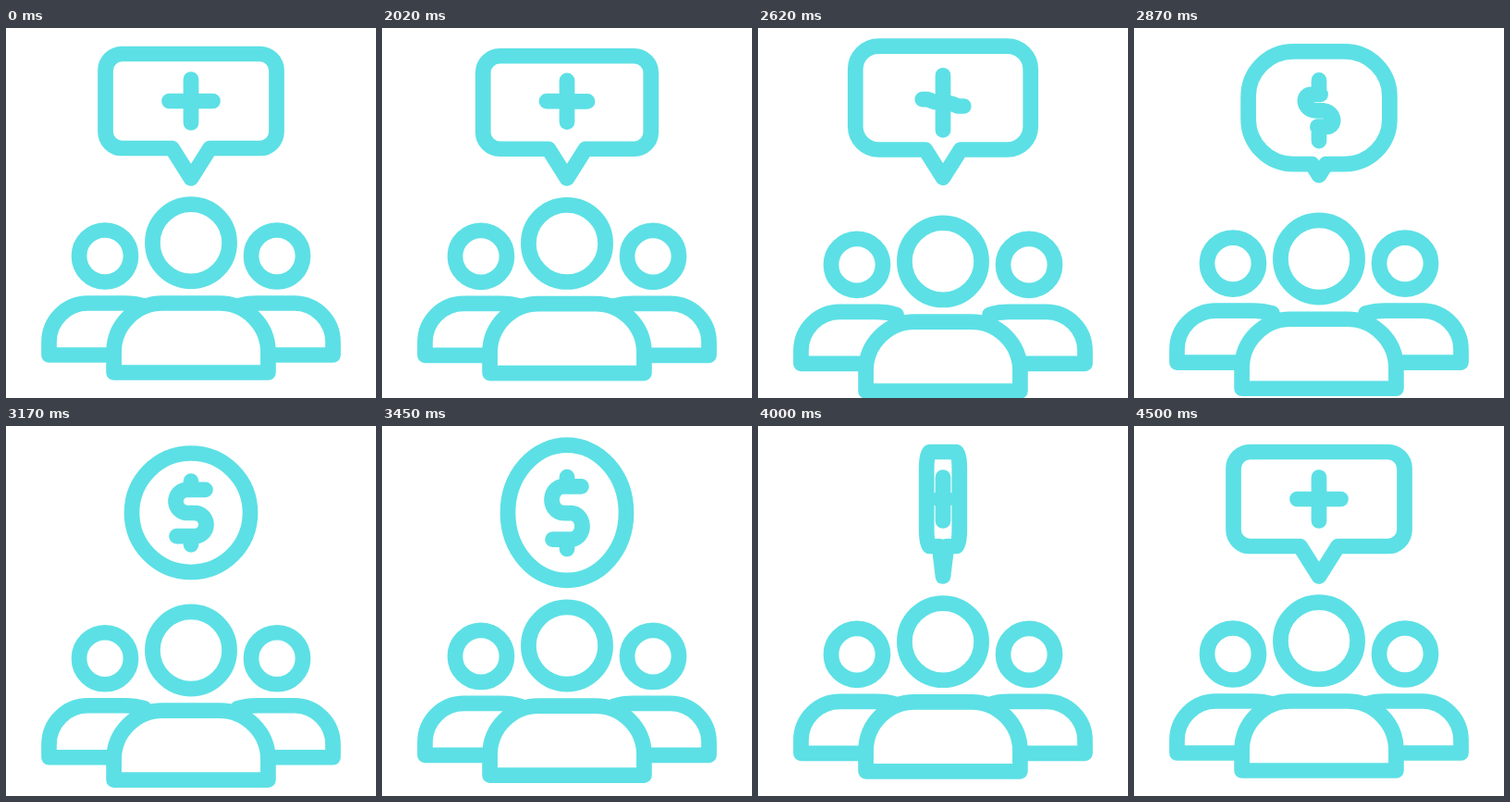
Recreate the animation shown at these times as an HTML page. Size 400 by 400 pixels, loop 4520 ms.

```html
<!DOCTYPE html>
<html lang="en">
<head>
<meta charset="utf-8">
<title>Group, care and cost</title>
<style>
  html, body { margin: 0; height: 100%; overflow: hidden; background: #fff; }
  svg { display: block; width: 100%; height: 100%; }
</style>
</head>
<body>
<svg viewBox="0 0 400 400" fill="none" stroke="#5ce0e5" stroke-width="16.7"
     stroke-linecap="round" stroke-linejoin="round">
  <g id="sides">
    <g id="member">
      <circle cx="107" cy="246.5" r="28"/>
      <path d="M116 353.5H46.5V339.5A42 42 0 0 1 88.5 297.5H128Q140 297.5 149.5 300.5"/>
    </g>
    <use href="#member" transform="translate(400) scale(-1 1)"/>
  </g>
  <g id="leader">
    <circle cx="200" cy="232.3" r="41.6"/>
    <path d="M116.6 372.5V350.5A53 53 0 0 1 169.6 297.5H230.4A53 53 0 0 1 283.4 350.5V372.5Z"/>
  </g>
  <path id="frame"/>
  <path id="sign"/>
</svg>
<script>
const LOOP = 4520, COIN_Y = 93.75, SIGN_Y = 81, TIP_Y = 163;
const el = id => document.getElementById(id);
const mix = (a, b, k) => a + (b - a) * k;
const part = (t, from, to) => Math.min(1, Math.max(0, (t - from) / (to - from)));
const sine = p => (1 - Math.cos(Math.PI * p)) / 2;
const quadOut = p => 1 - (1 - p) ** 2;

function bezier(x1, y1, x2, y2) {
  const at = (a, b, u) => 3 * a * u * (1 - u) ** 2 + 3 * b * u * u * (1 - u) + u ** 3;
  return p => {
    let low = 0, high = 1;
    for (let i = 0; i < 24; i++) {
      const mid = (low + high) / 2;
      if (at(x1, x2, mid) < p) low = mid; else high = mid;
    }
    return at(y1, y2, low);
  };
}
const sink = bezier(.33, .2, .3, 1);
const rise = bezier(.333, 0, .23, 1);

// Rounded box with a tip (k = 0) that becomes a circle (k = 1)
function framePath(k, width, scaleY) {
  const x = (from, to) => width * mix(from, to, k);
  const y = (from, to) => scaleY(mix(from, to, k));
  const w = x(92.5, 64), rx = x(18, 64), notch = x(20.5, 0);
  const top = y(28, 30), shoulder = y(46, COIN_Y), hip = y(112, COIN_Y);
  const bottom = y(130, 157.5), tip = y(162.5, 157.5);
  const arc = (ry, px, py) => `A${rx} ${ry} 0 0 1 ${px} ${py}`;
  const upper = shoulder - top, lower = bottom - hip;
  return `M${rx - w} ${top}H${w - rx}` + arc(upper, w, shoulder) + `V${hip}` +
    arc(lower, w - rx, bottom) + `H${notch}L0 ${tip}L${-notch} ${bottom}H${rx - w}` +
    arc(lower, -w, hip) + `V${shoulder}` + arc(upper, rx - w, top) + 'Z';
}

// Point of an S at u from -1 to 1: short straight, half circle, long straight
function sPoint(u) {
  const r = 12.5, straight = 4, bend = Math.PI * r, side = Math.sign(u);
  const d = Math.abs(u) * (straight + bend + 19.5);
  const a = Math.min(Math.max(0, d - straight), bend) / r;
  const x = Math.min(d, straight) + r * Math.sin(a) - Math.max(0, d - straight - bend);
  return [side * x, 94 + side * r * (1 - Math.cos(a))];
}

// Plus (k = 0) whose crossbar curls into the S of a dollar sign (k = 1)
function signPath(k, width, scaleY) {
  const points = [];
  for (let u = -1; u <= 1.001; u += .04) {
    const [x, y] = sPoint(u);
    points.push([width * mix(23.5 * u, x, k), scaleY(mix(79, y, k))]);
  }
  const y = (from, to) => scaleY(mix(from, to, k));
  return 'M' + points.join('L') + `M0 ${y(55.5, 60)}V${y(79, 69)}M0 ${y(79, 119)}V${y(102.5, 128)}`;
}

function pulse(t) {
  if (t < 2140) return mix(1, .94, quadOut(part(t, 2000, 2140)));
  if (t < 2500) return mix(.94, 1.07, sine(part(t, 2140, 2500)));
  return mix(1.07, 1, sine(part(t, 2500, 3170)));
}

function draw(t) {
  const drop = sink(part(t, 2000, 2500)) - rise(part(t, 2500, 4500));
  el('leader').setAttribute('transform', `translate(0 ${20.3 * drop})`);
  el('sides').setAttribute('transform', `translate(0 ${9.5 * drop})`);

  // The coin turns edge-on and comes round again as the bubble
  const turn = Math.cos(Math.PI * sine(part(t, 3405, 4510)));
  const change = turn < 0 ? 0
    : .08 * quadOut(part(t, 2000, 2450)) + .92 * sine(part(t, 2540, 3120));
  const stretch = 1 + .147 * Math.sin(Math.PI * part(t, 3170, 4000) ** .6);
  const show = (id, path, size, anchor) => {
    const scaleY = y => mix(COIN_Y, mix(anchor, y, size), stretch);
    el(id).setAttribute('d', path(change, size * Math.abs(turn), scaleY));
    el(id).setAttribute('transform', 'translate(200)');
  };
  const size = pulse(t);
  show('frame', framePath, size, TIP_Y);
  show('sign', signPath, 1 + 3 * (size - 1), SIGN_Y);
}

function tick() {
  draw(performance.now() % LOOP);
  requestAnimationFrame(tick);
}
tick();
</script>
</body>
</html>
```
